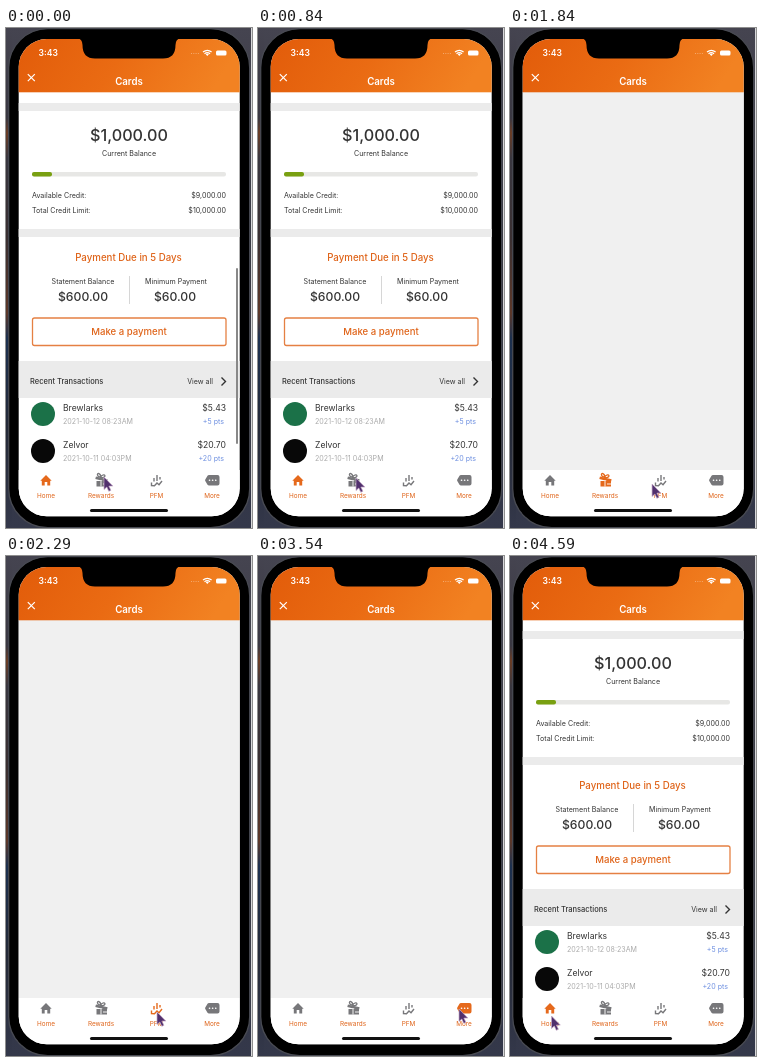
An HTML page for the animation above (4.64 s loop, 246 by 500 pixels).

```html
<!DOCTYPE html>
<html lang="en">
<head>
<meta charset="utf-8">
<title>Card app tabs</title>
<style>
  html, body { margin: 0; width: 100%; height: 100%; overflow: hidden; background: #3a3b47; }
  svg { display: block; width: 246px; height: 500px; font-family: Inter, "Liberation Sans", sans-serif; }
  .mid { text-anchor: middle; }
  .end { text-anchor: end; }
  .accent { fill: #df6318; }
  .tab { color: #77777a; }
  .tab.on { color: #e5691c; }
</style>
</head>
<body>
<svg viewBox="0 0 246 500">
  <defs>
    <linearGradient id="backdrop" x2="0" y2="1">
      <stop stop-color="#454450"/><stop offset=".5" stop-color="#30313c"/><stop offset="1" stop-color="#34384a"/>
    </linearGradient>
    <linearGradient id="leftEdge" x2="0" y2="1">
      <stop stop-color="#454450"/><stop offset=".18" stop-color="#3a3842"/>
      <stop offset=".21" stop-color="#6b3d25"/><stop offset=".26" stop-color="#393740"/>
      <stop offset=".42" stop-color="#3a3032"/><stop offset=".57" stop-color="#5d3829"/>
      <stop offset=".62" stop-color="#1d3150"/><stop offset=".8" stop-color="#252a38"/>
      <stop offset="1" stop-color="#34384a"/>
    </linearGradient>
    <linearGradient id="header" x2="1" y2=".15">
      <stop stop-color="#e25c0a"/><stop offset=".5" stop-color="#ea6b13"/><stop offset="1" stop-color="#f28222"/>
    </linearGradient>
    <clipPath id="screen"><rect x="12.700" y="11" width="221" height="477.300" rx="28"/></clipPath>
  </defs>

  <rect width="246" height="500" fill="url(#backdrop)"/>
  <rect width="6" height="500" fill="url(#leftEdge)"/>
  <rect x="2.700" y=".7" width="241" height="499" rx="39" stroke="#484a52" stroke-width="1.300"/>
  <rect x="245" width="1" height="500" fill="#d8d8da"/>

  <g clip-path="url(#screen)">
    <rect x="12" y="11" width="222" height="478" fill="#fff"/>
    <rect id="blank" x="12" y="64" width="222" height="378" fill="#f0f0f0"/>
    <g id="home" fill="#333" font-size="7.1">
      <path d="M12 75h222v8H12zM12 201h222v8H12zM12 333h222v37H12z" fill="#ebebeb"/>
      <g class="mid">
        <text x="123" y="113" font-size="16.2" font-weight="500">$1,000.00</text>
        <text x="123" y="128">Current Balance</text>
        <text class="accent" x="122.5" y="233" font-size="9.7" font-weight="500">Payment Due in 5 Days</text>
        <text x="77" y="256">Statement Balance</text>
        <text x="170" y="256">Minimum Payment</text>
        <g font-size="12.2" font-weight="500">
          <text x="77" y="272.5">$600.00</text>
          <text x="169" y="272.5">$60.00</text>
        </g>
        <text class="accent" x="123" y="307" font-size="9.6" font-weight="500">Make a payment</text>
      </g>
      <rect x="26" y="144" width="194" height="4.5" rx="2" fill="#e7e7e5"/>
      <rect x="26" y="144" width="20" height="4.5" rx="2" fill="#79a011"/>
      <text x="26" y="169.5">Available Credit:</text><text class="end" x="220" y="169.5">$9,000.00</text>
      <text x="26" y="185">Total Credit Limit:</text><text class="end" x="220" y="185">$10,000.00</text>
      <path d="M123.5 248v28" stroke="#ccc" stroke-width=".8"/>
      <rect x="26.5" y="290" width="193.5" height="27.5" rx="2" fill="none" stroke="#e58043" stroke-width="1.3"/>
      <text x="24" y="356" font-size="7.5" font-weight="500">Recent Transactions</text>
      <text class="end" x="207" y="356">View all</text>
      <path d="M215.5 349.5l4 4-4 4" fill="none" stroke="#333" stroke-width="1.4"/>
      <g id="rows"></g>
      <rect id="scrollbar" x="230" y="240" width="2" height="176" rx="1" fill="#888"/>
    </g>

    <rect x="12" y="442" width="222" height="47" fill="#fff"/>
    <g class="tab" fill="currentColor">
      <path d="M34.3 452.700l5.700-5.700 5.700 5.700h-1.500v4.800h-2.900v-3.500h-2.600v3.500h-2.900v-4.800z"/>
    </g>
    <g class="tab" fill="currentColor">
      <path d="M90.5 453h10.500v5.500H90.500z"/>
      <g transform="rotate(14 95 451)">
        <path d="M89.5 449.700h12v2.800h-12z"/>
        <path d="M94 449.500c-4 0-4.500-3.500-2.300-3.200s2.300 3.200 2.300 3.200 1-3.200 3-3.200 1.500 3.200-3 3.200z" fill="none" stroke="currentColor" stroke-width="1.3"/>
      </g>
      <path d="M95 452v6.500M97 456h4" stroke="#fff" stroke-width=".9"/>
    </g>
    <g class="tab" fill="none" stroke="currentColor" stroke-width="1.4">
      <path d="M148 450v3.500M151 447v6M154 449v2.500"/>
      <path d="M145.500 454.500v3l3 .3 2.500-2.800 2 1.700 3-3.700"/>
    </g>
    <g class="tab" fill="currentColor">
      <path d="M203 447h8.500q2 0 2 2v6.500q0 2-2 2H203q-1 0-1.500-.8l-2.200-3.700q-.5-.7 0-1.400l2.200-3.800q.5-.8 1.500-.8z"/>
      <path d="M203.500 452.300h.1m3 0h.1m3 0h.1" stroke="#fff" stroke-width="1.6" stroke-linecap="round"/>
    </g>
    <g class="mid accent" font-size="6.4">
      <text x="40" y="470">Home</text><text x="95" y="470">Rewards</text>
      <text x="150.5" y="470">PFM</text><text x="206" y="470">More</text>
    </g>
    <rect x="84" y="481" width="78" height="3" rx="1.5" fill="#111"/>

    <rect x="12" y="11" width="222" height="53.300" fill="url(#header)"/>
    <g fill="#fff">
      <text x="32.5" y="28.3" font-size="8.6" font-weight="600">3:43</text>
      <text class="mid" x="123" y="56.700" font-size="9.7" font-weight="600">Cards</text>
      <rect x="210" y="22.5" width="10.5" height="5" rx="1.5"/>
      <path d="M201.300 28l-1.600-1.800q1.600-1.200 3.200 0z"/>
      <path d="M185 25.5h8" stroke="#fff" stroke-width=".9" stroke-dasharray="1 1.3" opacity=".4"/>
    </g>
    <g fill="none" stroke="#fff" stroke-width="1.2">
      <path d="M21.800 46.200l7 7m0-7l-7 7"/>
      <path d="M197 24q4.300-3.400 8.600 0M198.500 25.700q2.800-2 5.600 0"/>
    </g>
  </g>
  <path d="M71 10H175Q169.500 11 169.500 17Q169.500 30.500 157 30.500H89Q76.500 30.500 76.500 17Q76.500 11 71 10z"/>
  <path id="cursor" d="M0 0v12.500l2.800-2.500 2 4.300 2.100-1-2-4.200h3.900z" fill="#51306e" stroke="#c4a9c6" stroke-width=".7"/>
</svg>
<script>
const LOOP = 4640;
const $ = id => document.getElementById(id);
const tabs = document.querySelectorAll('.tab');

const row = (y, color, name, date, amount, points) => `
  <circle cx="37" cy="${y}" r="12" fill="${color}"/>
  <text x="57" y="${y - 3}" font-size="8.6">${name}</text>
  <text x="57" y="${y + 9.5}" fill="#aaa">${date}</text>
  <text class="end" x="220" y="${y - 3}" font-size="8.6">${amount}</text>
  <text class="end" x="218" y="${y + 9.5}" fill="#6d8fe0">${points}</text>`;
$('rows').innerHTML =
  row(386, '#1b7148', 'Brewlarks', '2021-10-12 08:23AM', '$5.43', '+5 pts') +
  row(423, '#080808', 'Zelvor', '2021-10-11 04:03PM', '$20.70', '+20 pts');

// Time, x and y of the pointer tip
const path = [
  [0, 98, 449], [840, 98, 450], [1450, 98, 450], [1840, 142, 456], [2000, 151, 456],
  [2500, 151, 456], [2740, 169, 456], [3100, 201, 453], [3590, 201, 453],
  [3940, 41.5, 466], [4100, 41.5, 460], [LOOP, 41.5, 460]
];
const taps = [1250, 2250, 3290, 4290];

function pointerAt(t) {
  const i = path.findIndex(key => key[0] > t);
  const [t0, x0, y0] = path[i - 1], [t1, x1, y1] = path[i];
  const k = (t - t0) / (t1 - t0);
  return [x0 + (x1 - x0) * k, y0 + (y1 - y0) * k];
}

function draw() {
  const t = performance.now() % LOOP;
  const active = taps.filter(tap => t >= tap).length % tabs.length;
  tabs.forEach((tab, i) => tab.classList.toggle('on', i === active));
  $('home').style.display = active ? 'none' : '';
  $('blank').style.display = active ? '' : 'none';
  $('scrollbar').style.opacity = t < 100 ? 1 : Math.max(0, 1 - (t - 100) / 300);
  $('cursor').setAttribute('transform', `translate(${pointerAt(t)})`);
  requestAnimationFrame(draw);
}
draw();
</script>
</body>
</html>
```
